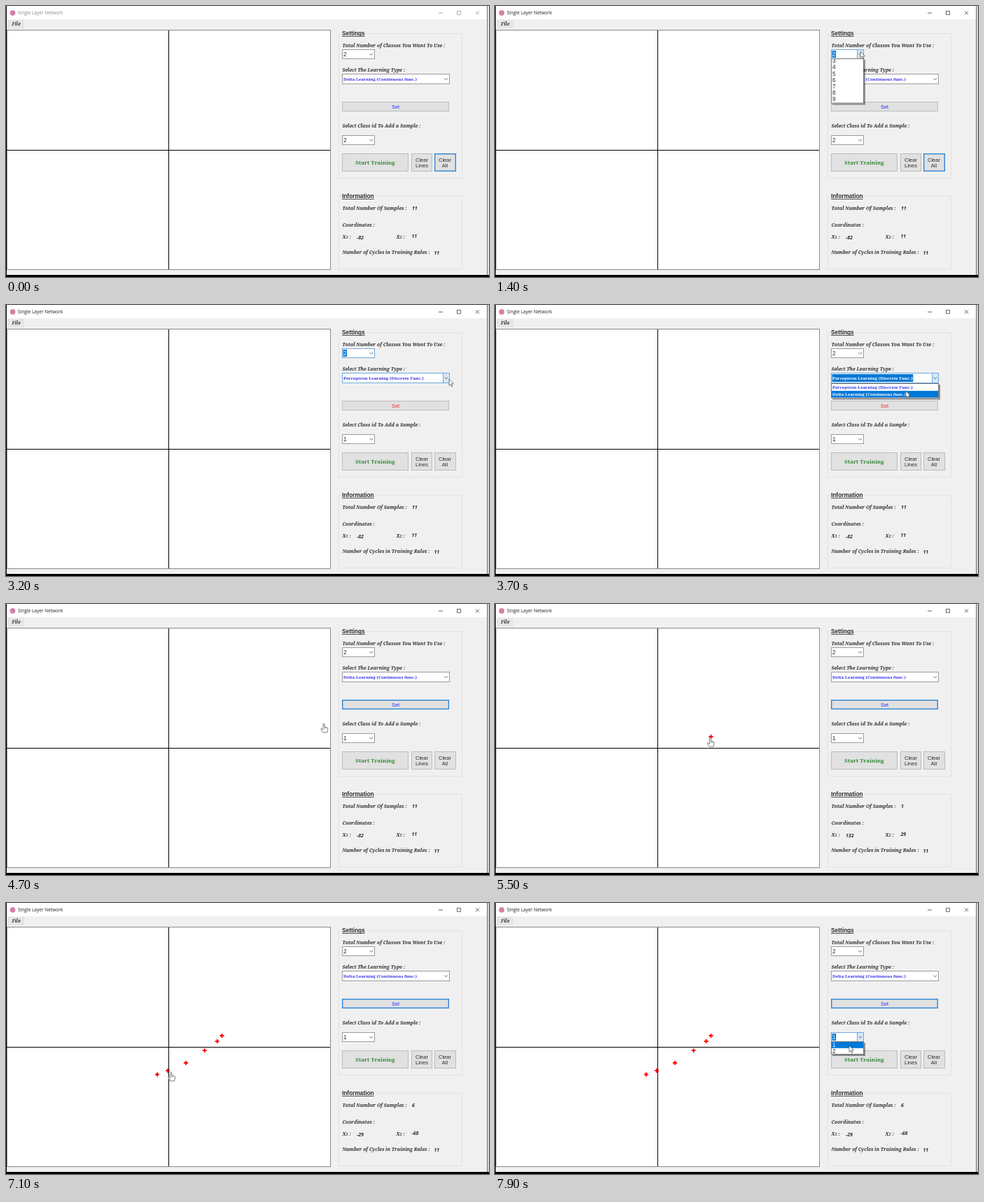
Recreate the animation shown at these times as an HTML page with a canvas. Size 690 by 388 pixels, loop 8 s.

```html
<!DOCTYPE html>
<html lang="en">
<head>
<meta charset="utf-8">
<title>Single Layer Network</title>
<style>
html, body { margin: 0; width: 100%; height: 100%; overflow: hidden; }
canvas { display: block; }
</style>
</head>
<body>
<canvas id="stage" width="690" height="388"></canvas>
<script>
const ctx = document.getElementById('stage').getContext('2d');
const LOOP = 8000;
const BLUE = '#0078d7', SOFT_BLUE = '#6fa8de', INK = '#2c2c2c', LINK = '#3a32e4';
const SANS = '"Liberation Sans", Arial, sans-serif';
const SERIF = '"Noto Serif", serif';
const LABEL = `italic bold 6.75px ${SERIF}`;
const VALUE = 'italic bold 7px "Open Sans", sans-serif';
const CHOICE = `bold 6.1px ${SERIF}`;
const DIGIT = `8.3px ${SANS}`;
const CENTER = { x: 232.5, y: 206.5 }, UNITS = 1.74;
const RULES = ['Perceptron Learning (Discrete Func.)', 'Delta Learning (Continuous func.)'];

// Samples placed on the plane: time, x, y
const samples = [
  [5400, 308.5, 190], [5800, 301.7, 198], [6100, 283.7, 211.2],
  [6500, 257, 229], [6700, 231, 240], [6900, 216, 245.5]
];

// Pointer path: time, x, y of the tip
const path = [
  [600, 688, 190], [1200, 522, 65], [1800, 522, 65], [2000, 518, 79], [2250, 518, 79],
  [2900, 633, 106], [3300, 633, 106], [3600, 587, 123], [4000, 587, 123],
  [4300, 562, 142], [4500, 562, 142], [4700, 454, 171], [5000, 397, 186], [5150, 397, 186],
  ...samples.slice(0, 3), [6300, 278.5, 215.5], ...samples.slice(3),
  [7000, 216, 245.5], [7650, 521, 190], [7800, 521, 190], [7900, 506, 204]
];

function pointerAt(t) {
  const i = path.findIndex(p => p[0] > t);
  if (i < 0) return path[path.length - 1].slice(1);
  const [t0, x0, y0] = path[i - 1], [t1, x1, y1] = path[i];
  const u = (t - t0) / (t1 - t0), e = u * u * (3 - 2 * u);
  return [x0 + (x1 - x0) * e, y0 + (y1 - y0) * e];
}

function rect(x, y, w, h, fill, stroke, line = 1) {
  if (fill) { ctx.fillStyle = fill; ctx.fillRect(x, y, w, h); }
  if (stroke) {
    ctx.strokeStyle = stroke;
    ctx.lineWidth = line;
    ctx.strokeRect(x + line / 2, y + line / 2, w - line, h - line);
  }
}

function text(str, x, y, font, color = INK, align = 'left') {
  ctx.font = font;
  ctx.fillStyle = color;
  ctx.textAlign = align;
  ctx.fillText(str, x, y);
  return ctx.measureText(str).width;
}

function lines(color, width, ...polys) {
  ctx.strokeStyle = color;
  ctx.lineWidth = width;
  ctx.beginPath();
  for (const [x, y, ...rest] of polys) {
    ctx.moveTo(x, y);
    for (let i = 0; i < rest.length; i += 2) ctx.lineTo(rest[i], rest[i + 1]);
  }
  ctx.stroke();
}

function group(name, y, h) {
  rect(475, y, 177, h, null, '#e2e2e2');
  ctx.font = `bold 8.3px ${SANS}`;
  const w = ctx.measureText(name).width;
  rect(479, y - 4, w + 3, 10, '#f0f0f0');
  text(name, 480, y + 3, ctx.font);
  rect(480, y + 4, w, 1, '#555');
}

function button(x, y, w, h, focus) {
  rect(x, y, w, h, '#e1e1e1', focus ? '#2f86d6' : '#bcbcbc', focus ? 1.4 : 1);
}

function combo(y, w, h, label, { font = DIGIT, color = INK, selected, hot, focus, base = 9.6 } = {}) {
  const right = 480 + w;
  rect(480, y, w, h, '#fff', hot || focus ? SOFT_BLUE : '#9c9c9c');
  if (hot) rect(right - 10, y, 10, h, '#d6e8f8', SOFT_BLUE);
  ctx.font = font;
  if (selected) rect(481.5, y + 2, ctx.measureText(label).width + 1, h - 4, BLUE);
  text(label, 482, y + base, font, selected ? '#fff' : color);
  const cx = right - 5.3, cy = y + h / 2;
  lines('#555', 0.9, [cx - 2.3, cy - 1, cx, cy + 1.2, cx + 2.3, cy - 1]);
}

function list(y, w, h, items, pitch, chosen, font, color, offset = 0) {
  rect(482, y + 2, w, h, 'rgba(0,0,0,.4)');
  rect(480, y, w, h, '#fff', '#777');
  ctx.save();
  ctx.beginPath();
  ctx.rect(481, y + 1, w - 2, h - 2);
  ctx.clip();
  items.forEach((item, i) => {
    const top = y + 1 + i * pitch - offset;
    if (i === chosen) rect(481, top, w - 2, pitch, BLUE);
    text(item, 482, top + pitch / 2 + (font === DIGIT ? 3 : 2.2), font, i === chosen ? '#fff' : color);
  });
  ctx.restore();
}

function drawFrame(active) {
  rect(0, 0, 690, 388, '#000');
  rect(687, 0, 3, 385, active ? '#d0d0d0' : '#e4e4e4');
  rect(1, 0, 686, 385, '#f0f0f0');
  rect(1, 0, 686, 19, '#fff');
  lines('#777', 1, [687.5, 0, 687.5, 385]);
  const ink = active ? '#222' : '#8c8c8c';
  ctx.fillStyle = '#d77fa8';
  ctx.beginPath();
  ctx.arc(9.5, 9.8, 3.9, 0, 7);
  ctx.fill();
  text('Single Layer Network', 17, 12.3, '6.55px "Open Sans", sans-serif', ink);
  lines(ink, 0.7, [618, 10, 624, 10], [644.5, 7.3, 649.5, 7.3, 649.5, 12.3, 644.5, 12.3, 644.5, 6.9],
    [671, 7.3, 676, 12.3], [676, 7.3, 671, 12.3]);
  rect(2, 20, 24, 12, '#e6e6e6');
  text('File', 8.5, 28, `italic bold 6.5px ${SERIF}`);
  rect(1, 34, 463, 344, '#fff', '#8a8a8a');
  lines('#000', 1, [CENTER.x, 35, CENTER.x, 377], [1, CENTER.y, 463, CENTER.y]);
}

function drawSettings(t) {
  const firstOpen = t >= 1350 && t < 2200;
  const ruleOpen = t >= 3350 && t < 4050;
  const classOpen = t >= 7850;
  const clearFocus = t < 1500, setFocus = t >= 4500;
  const changed = t >= 2200 && t < 4500;

  group('Settings', 39, 208);
  text('Total Number of Classes You Want To Use :', 480.5, 58.6, LABEL);
  combo(62, 47, 14, '2', {
    selected: t >= 1300 && t < 3350, focus: t >= 1300 && t < 3350,
    hot: t >= 1150 && t < 2200
  });
  text('Select The Learning Type :', 480.5, 93.6, LABEL);
  combo(97, 154, 15, RULES[t >= 2200 && t < 4050 ? 0 : 1], {
    font: CHOICE, color: LINK, base: 9.5, selected: ruleOpen, hot: t >= 2800 && t < 4050
  });
  button(480, 137, 153, 14, setFocus);
  text('Set', 556.5, 147.2, `7.4px ${SANS}`, changed ? '#ea2e2e' : '#3030f2', 'center');
  text('Select Class id To Add a Sample :', 480.5, 174, LABEL);
  combo(185, 47, 14, t < 2200 ? '2' : '1', { selected: classOpen, hot: t >= 7650 });
  button(480, 211, 95, 26);
  text('Start Training', 527.5, 226.8, `bold 7.9px ${SERIF}`, '#388a3a', 'center');
  button(579, 211, 30, 26);
  button(612, 211, 31, 26, clearFocus);
  [['Clear', 594, 222.6], ['Lines', 594, 231.3], ['Clear', 627, 222.6], ['All', 627, 231.3]]
    .forEach(([s, x, y]) => text(s, x, y, `7.5px ${SANS}`, INK, 'center'));

  if (firstOpen) {
    const h = 76 * Math.min(1, (t - 1250) / 178);
    list(75, 47, h, [...'23456789'], 9.2, 0, DIGIT, INK, 76 - h);
  }
  if (ruleOpen) list(112, 154, 21.5, RULES, 9.9, t < 3500 ? 0 : 1, CHOICE, LINK);
  if (classOpen) list(198, 47, 19, ['1', '2'], 8.8, 0, DIGIT, INK);
}

function drawInformation(placed) {
  const last = placed[placed.length - 1];
  const coords = last
    ? [Math.round((last[1] - CENTER.x) * UNITS), Math.round((CENTER.y - last[2]) * UNITS)]
    : [-82, 11];
  group('Information', 272, 105);
  text('Total Number Of Samples :', 480.5, 292, LABEL);
  text(placed.length || 11, 580, 292, VALUE);
  text('Coordinates :', 480.5, 316, LABEL);
  [[480.5, 501, 333.7], [557.5, 579.5, 332.2]].forEach(([x, valueX, valueY], i) => {
    const w = text('X', x, 333, LABEL);
    const d = text(i + 1, x + w, 333, `italic bold 5.5px ${SERIF}`);
    text(':', x + w + d + 2, 333, LABEL);
    text(coords[i], valueX, valueY, VALUE);
  });
  text('Number of Cycles in Training Rules :', 480.5, 355.4, LABEL);
  text(11, 611.5, 355.6, VALUE);
}

function drawPointer(t) {
  if (t < 600) return;
  const [x, y] = pointerAt(t);
  const hand = x < 463;
  const shape = new Path2D(hand
    ? 'M-1 1Q0-.6 1 1V5L5 6Q6 6.5 5.7 8.5L4.6 13H-1.2L-4 8.6Q-4.3 7-2.8 7.4L-1 9Z'
    : 'M0 0V9.3L2.1 7.4L3.6 10.8L5.1 10.1L3.6 6.8H6.4Z');
  ctx.save();
  ctx.translate(x, y);
  ctx.fillStyle = '#fff';
  ctx.fill(shape);
  ctx.strokeStyle = '#444';
  ctx.lineWidth = 0.7;
  ctx.stroke(shape);
  if (hand) lines('#444', 0.5, [1.2, 5, 1.2, 7.5], [3, 5.6, 3, 7.7]);
  ctx.restore();
}

function draw(now) {
  const t = now % LOOP;
  const placed = samples.filter(s => s[0] <= t);
  drawFrame(t >= 600);
  drawSettings(t);
  drawInformation(placed);
  for (const [, x, y] of placed) lines('#f00', 1.8, [x - 3, y, x + 3, y], [x, y - 3, x, y + 3]);
  drawPointer(t);
  requestAnimationFrame(draw);
}
requestAnimationFrame(draw);
</script>
</body>
</html>
```
